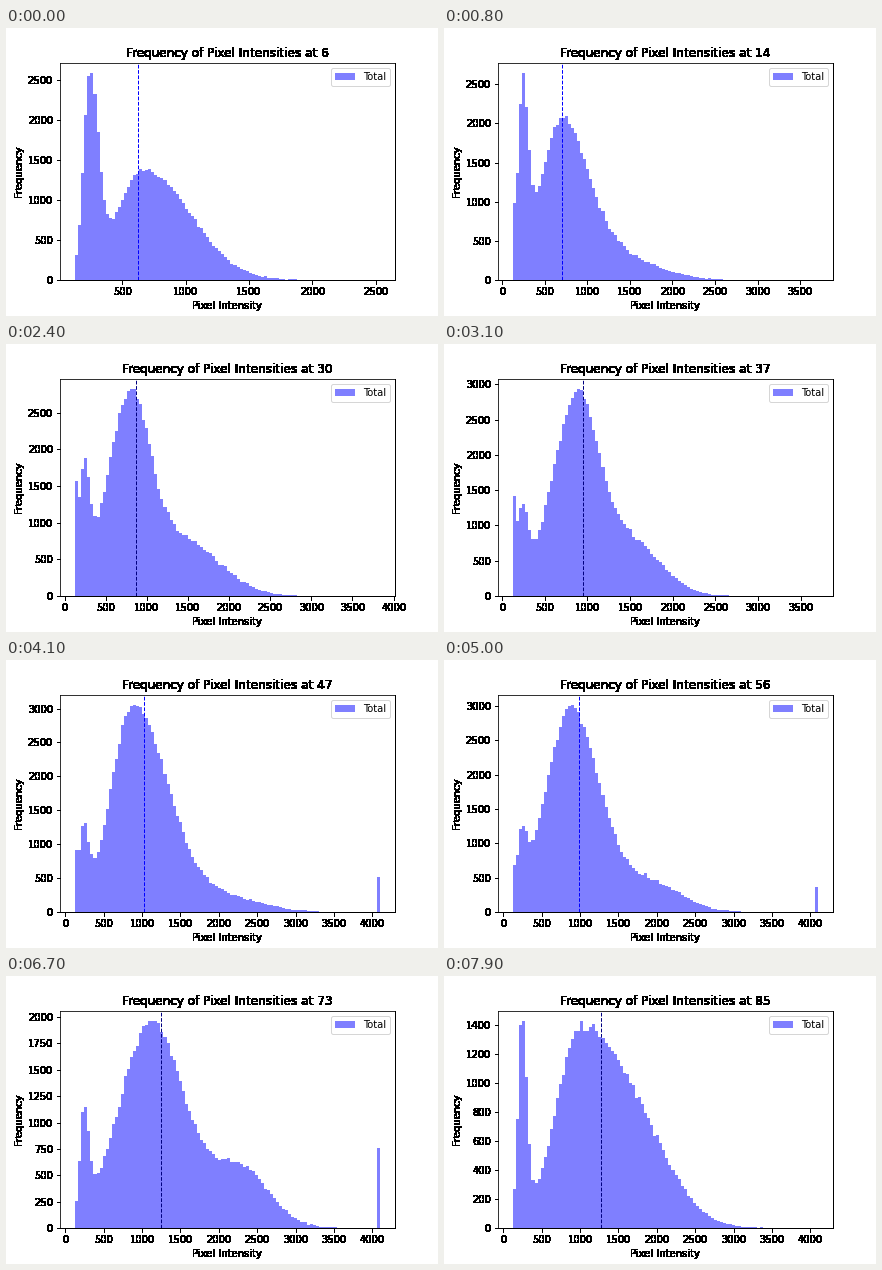
Animation of 432x288 px, one loop 8000 ms. Source, as a matplotlib script:

```python
import numpy as np
import matplotlib.pyplot as plt
from matplotlib.animation import FuncAnimation

FRAMES, STEP = 80, 100
FIRST = 6                              # number in the first title
BINS, LOW = 100, 130
KEYS = (0, 17, 31, 41, 58, 67, 79)     # turning points of the motion

plt.rcParams.update({
    "font.family": "DejaVu Sans",
    "font.size": 10,
    "figure.subplot.bottom": 0.125,
})


def track(*values, at=KEYS):
    """Piecewise linear value over the frame number."""
    return lambda i: np.interp(i, at, values)


top_value = track(2530, 3850, 3895, 3830, 3698, 4095, at=(0, 9, 17, 24, 31, 36))
clipped = track(0, 515, 237, 760, 0, at=(35, 41, 58, 67, 79))
mean_value = track(624, 792, 948, 1029, 947, 1247, 1273)
peak = track(2588, 2710, 2936, 3053, 2979, 1964, 1431)

# dark pixels: a cut-off edge and a narrow bump
edge = track(0, 1850, 1850, 1100, 0, 0, 0)
dark = track(2376, 1860, 950, 980, 560, 930, 1270)

# main hump, steeper on one side
hump = track(1365, 2400, 2660, 3000, 2900, 1900, 560)
hump_at = track(680, 720, 880, 890, 885, 1130, 900)
hump_left = track(230, 272, 300, 295, 370, 425, 220)
hump_right = track(355, 240, 235, 435, 280, 410, 300)

# bright shoulder
tail = track(0, 700, 850, 240, 640, 560, 1000)
tail_at = track(1200, 1400, 1450, 2000, 1750, 2250, 1420)
tail_width = track(400, 530, 380, 500, 350, 400, 560)


def bump(x, centre, left, right):
    return np.exp(-0.5 * ((x - centre) / np.where(x < centre, left, right)) ** 2)


def counts_at(i, edges):
    x = (edges[:-1] + edges[1:]) / 2
    smooth = (edge(i) * np.exp((LOW - x) / 40)
              + dark(i) * bump(x, 247, 48, 63)
              + hump(i) * bump(x, hump_at(i), hump_left(i), hump_right(i))
              + tail(i) * bump(x, tail_at(i), tail_width(i), tail_width(i)))
    smooth *= peak(i) / smooth.max()
    grain = np.random.default_rng(i).normal(0, 0.6, BINS) * np.sqrt(smooth)
    counts = np.clip(smooth + grain, 0, peak(i))
    counts[smooth.argmax()] = peak(i)
    counts[-1] += clipped(i)
    return counts


def solid(img, dpi):
    """Make every touched pixel fully black, for heavy unsmoothed labels."""
    out = np.zeros_like(img)
    out[..., 3] = img[..., 3] > 0
    return out, 0, 0


fig, ax = plt.subplots(figsize=(6, 4), dpi=72)
hist = ax.stairs(np.ones(BINS), np.linspace(0, 1, BINS + 1), fill=True,
                 color="blue", alpha=0.5, label="Total")
mean = ax.axvline(0, linestyle="dashed", linewidth=1)
title = ax.set_title("")
ax.set_xlabel("Pixel Intensity")
ax.set_ylabel("Frequency")
ax.legend(loc="upper right")
for part in (ax.xaxis, ax.yaxis, title, ax.spines["right"], ax.spines["bottom"]):
    part.set_agg_filter(solid)


def draw(i):
    top = top_value(i)
    edges = np.linspace(LOW, top, BINS + 1)
    counts = counts_at(i, edges)
    hist.set_data(counts, edges)
    mean.set_xdata([mean_value(i)] * 2)
    mean.set_color("blue" if i < 9 or 36 <= i < 63 else "navy")
    title.set_text(f"Frequency of Pixel Intensities at {FIRST + i}")
    margin = 0.05 * (top - LOW)
    ax.set_xlim(LOW - margin, top + margin)
    ax.set_ylim(0, 1.05 * counts.max())
    return hist, mean, title


anim = FuncAnimation(fig, draw, frames=FRAMES, interval=STEP, repeat=True)
plt.show()
```
